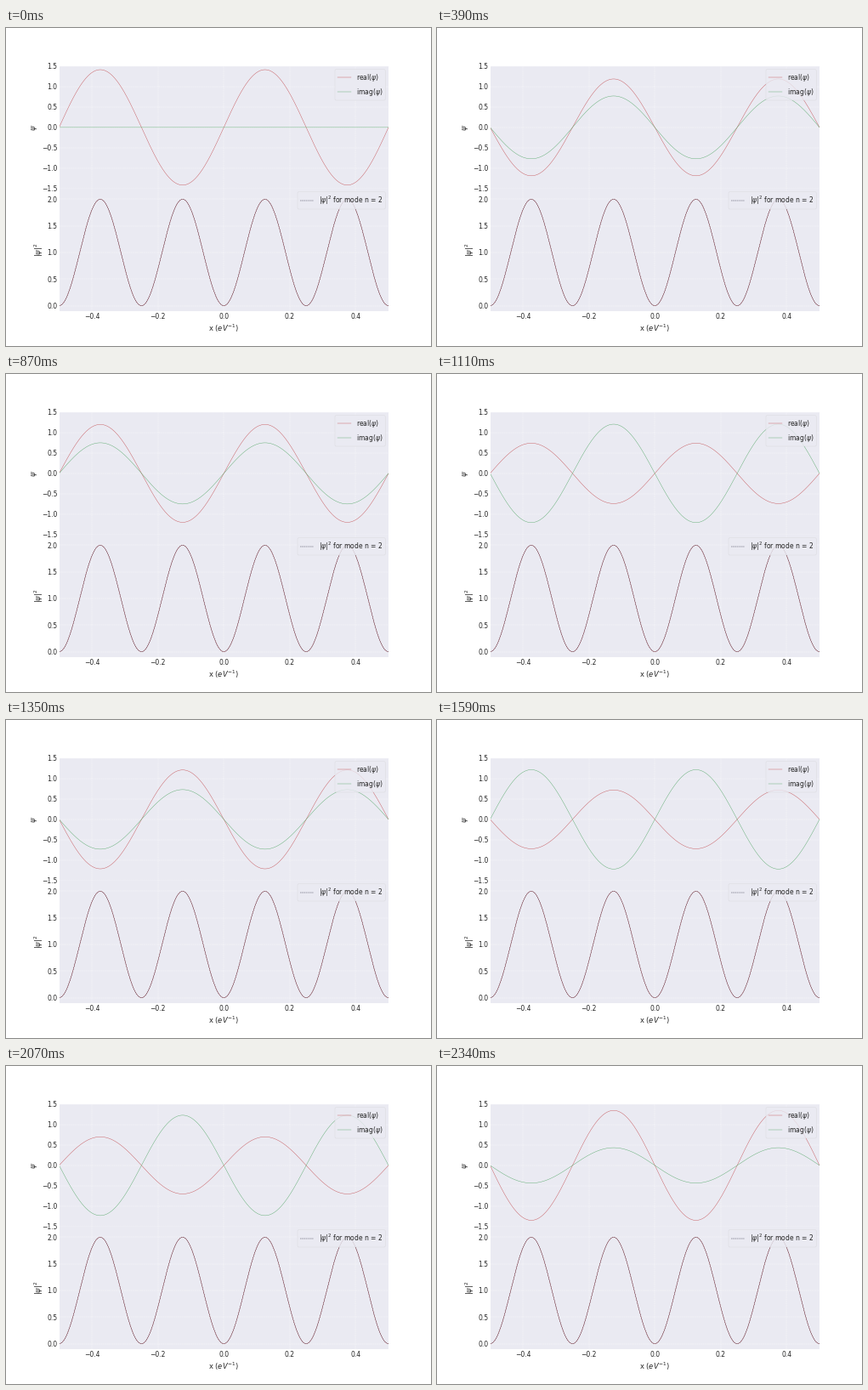
These frames come from a looping animation (500 px wide and 374 px high, 2370 ms). A matplotlib script:

```python
import numpy as np
import matplotlib.pyplot as plt
from matplotlib.animation import FuncAnimation
from matplotlib.patches import FancyBboxPatch

WIDTH, HEIGHT, DPI = 500, 374, 50
FRAMES, INTERVAL = 79, 30
RED, GREEN, DARK = "#C44E52", "#55A868", "#26263a"
PANEL, INK = "#EAEAF2", "0.15"
MODE = 2
ENERGY = (MODE * np.pi) ** 2 / 2
DT = 0.01

plt.rcParams.update({
    "font.family": "DejaVu Sans",
    "text.color": INK,
    "axes.labelcolor": INK,
    "axes.labelsize": 12,
    "axes.facecolor": PANEL,
    "axes.axisbelow": True,
    "lines.linewidth": 0.6,
})

fig, (top, bottom) = plt.subplots(
    2, 1, sharex=True, figsize=(WIDTH / DPI, HEIGHT / DPI), dpi=DPI,
    gridspec_kw=dict(left=0.125, right=0.9, bottom=0.11, top=0.88, hspace=0))
fig.patch.set_facecolor("white")


def style(ax, ylim, yticks, ylabel):
    ax.set_xlim(-0.5, 0.5)
    ax.set_ylim(*ylim)
    ax.set_xticks(np.arange(-2, 3) * 0.2)
    ax.set_yticks(yticks)
    ax.set_ylabel(ylabel)
    ax.grid(True, color="white", linestyle="--", linewidth=0.6)
    ax.tick_params(length=0, pad=2.7, labelsize=11, labelcolor=INK)
    for spine in ax.spines.values():
        spine.set_visible(False)


style(top, (-1.5, 1.5), np.arange(-3, 4) * 0.5, r"$\psi$")
style(bottom, (-0.1, 2.2), np.arange(5) * 0.5, r"$|\psi|^2$")
top.tick_params(labelbottom=False)
bottom.set_xlabel(r"x ($eV^{-1}$)")

x = np.linspace(-0.5, 0.5, 600)
mode = np.sqrt(2) * np.sin(2 * MODE * np.pi * x)

real_line, = top.plot(x, mode, color=RED)
imag_line, = top.plot(x, 0 * x, color=GREEN, snap=False)
density_line, = bottom.plot(x, mode ** 2, color=RED)
bottom.plot(x, mode ** 2, color=DARK, linestyle="--")

# Overlay in pixel coordinates for the two legends
overlay = fig.add_axes([0, 0, 1, 1], zorder=5)
overlay.set_xlim(0, WIDTH)
overlay.set_ylim(HEIGHT, 0)
overlay.axis("off")


def legend(left, upper, right, lower, rows):
    overlay.add_patch(FancyBboxPatch(
        (left, upper), right - left, lower - upper,
        boxstyle="round,pad=0,rounding_size=1.5",
        facecolor=PANEL, edgecolor="0.8", linewidth=0.45, alpha=0.8))
    for baseline, label, color, dash in rows:
        y = baseline - 2.6
        overlay.plot([left + 3.2, left + 18.8], [y, y],
                     color=color, linestyle=dash)
        overlay.text(left + 24.6, baseline, label, fontsize=11, va="baseline")


legend(387, 48.7, 446.2, 85, [
    (60.8, r"real($\psi$)", RED, "-"),
    (78, r"imag($\psi$)", GREEN, "-"),
])
legend(343, 192.7, 446.2, 213, [
    (206, r"$|\psi|^2$ for mode n = 2", DARK, "--"),
])


def update(i):
    psi = mode * np.exp(-1j * ENERGY * DT * i)
    real_line.set_ydata(psi.real)
    imag_line.set_ydata(psi.imag)
    density_line.set_ydata(np.abs(psi) ** 2)
    return real_line, imag_line, density_line


anim = FuncAnimation(fig, update, frames=FRAMES, interval=INTERVAL,
                     repeat=True, repeat_delay=0)
plt.show()
```
